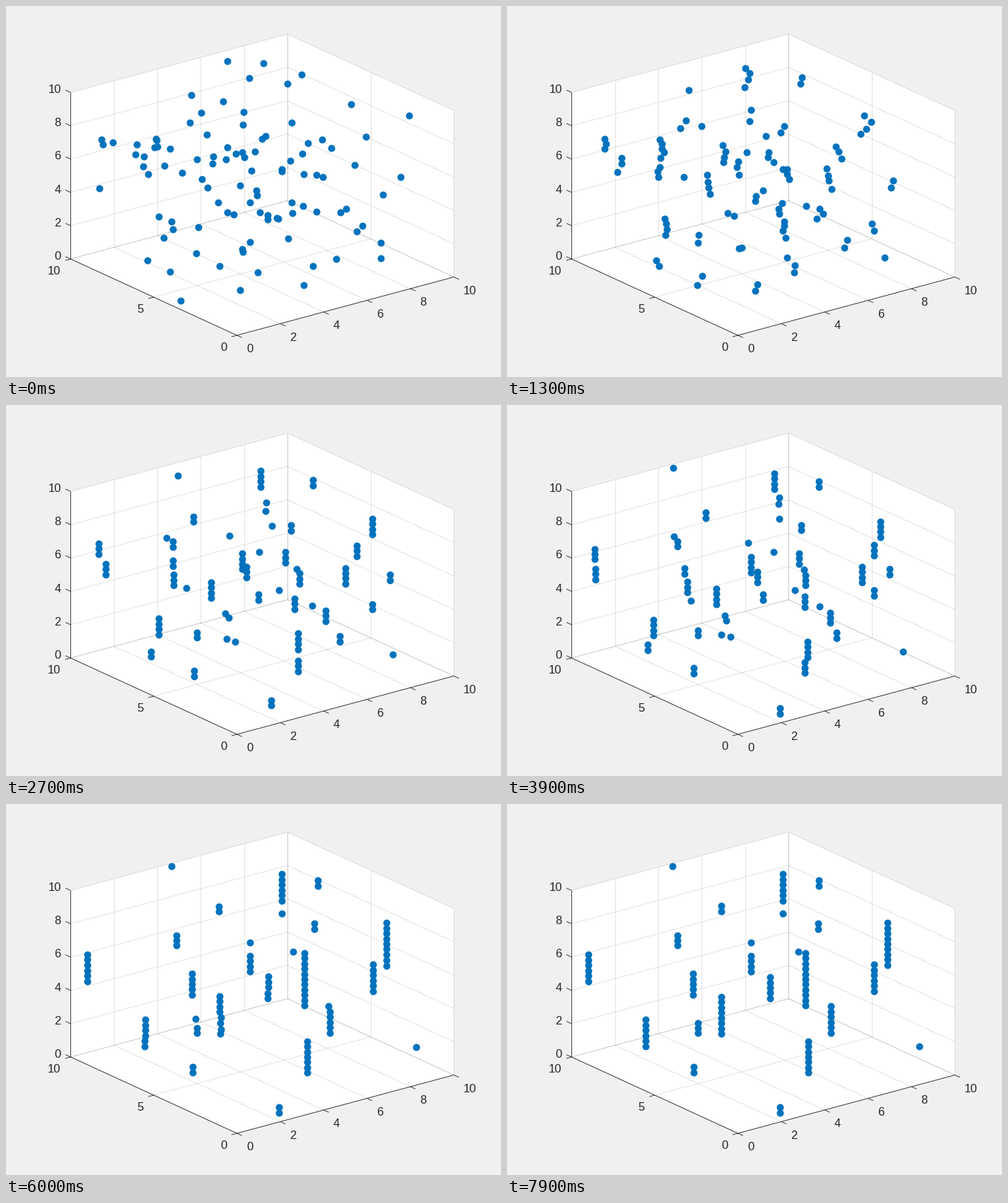
A matplotlib script that plays this animation: 700x525 px, repeating every 8 s.

```python
from itertools import combinations

import numpy as np
import matplotlib.pyplot as plt
from matplotlib.animation import FuncAnimation

W, H, DPI = 700, 525, 100
FRAMES, INTERVAL = 80, 100
GAP = 7.45            # vertical distance of stacked dots
GATHER_MS = 2600      # time in which dots close up into small groups
BLUE, INK = "#0072BD", "#262626"
PT = 72 / DPI         # one pixel in points

rng = np.random.default_rng(7)

fig = plt.figure(figsize=(W / DPI, H / DPI), dpi=DPI, facecolor="#F0F0F0")
ax = fig.add_axes([0, 0, 1, 1])
ax.set_xlim(0, W)
ax.set_ylim(H, 0)
ax.axis("off")

# ---- the box: orthographic projection of a 10 x 10 x 10 cube ----
ORIGIN = np.array([326.5, 466])
UX, UY, UZ = np.array([[30.68, -8.25], [-23.52, -10.8], [0, -23.57]])


def proj(x, y, z):
    return ORIGIN + x * UX + y * UY + z * UZ


def line(a, b, alpha=1.0, z=3):
    ax.plot(*zip(a, b), color=INK, alpha=alpha, lw=0.85 * PT, zorder=z,
            solid_capstyle="butt")


def grid(a, b):
    line(proj(*a), proj(*b), alpha=0.15, z=2)


def tick(p, d, value, shift, ha):
    line(p, p + d)
    ax.text(*(p + shift), str(value), ha=ha, va="center", color=INK,
            family="Liberation Sans", fontsize=16.67 * PT)


for wall in ([(0, 0, 0), (10, 0, 0), (10, 10, 0), (0, 10, 0)],
             [(0, 10, 0), (10, 10, 0), (10, 10, 10), (0, 10, 10)],
             [(10, 0, 0), (10, 10, 0), (10, 10, 10), (10, 0, 10)]):
    ax.fill(*zip(*[proj(*c) for c in wall]), color="white", lw=0, zorder=1)

for v in range(0, 11, 2):
    grid((v, 0, 0), (v, 10, 0))
    grid((v, 10, 0), (v, 10, 10))
    grid((0, 10, v), (10, 10, v))
    grid((10, 0, v), (10, 10, v))
    tick(proj(v, 0, 0), (7.3, 3.3), v, (13.7, 19.6), "left")
    tick(proj(0, 10, v), (-7.3, -3.3), v, (-13.5, -3.7), "right")
for v in (0, 5, 10):
    grid((0, v, 0), (10, v, 0))
    grid((10, v, 0), (10, v, 10))
    tick(proj(0, v, 0), (-7.6, 2.1), v, (-14.3, 17.6), "right")

line(proj(0, 0, 0), proj(10, 0, 0))
line(proj(0, 0, 0), proj(0, 10, 0))
line(proj(0, 10, 0), proj(0, 10, 10))

# ---- the dots: scattered, then small groups, then columns ----
# centre x, centre y and number of dots of each column at the end
COLUMNS = [
    (234, 88, 1), (303, 148, 2), (115, 232, 6), (241, 193, 3),
    (263, 255, 5), (196, 324, 6), (270, 317, 3), (303, 299, 8),
    (264, 376, 2), (386, 433, 2), (426, 358, 7), (372, 260, 5),
    (345, 196, 1), (345, 226, 4), (390, 118, 6), (390, 155, 1),
    (441, 112, 2), (440, 173, 2), (412, 209, 1), (422, 248, 11),
    (458, 305, 6), (519, 246, 6), (538, 198, 9), (583, 343, 1),
]


def offsets(n):
    """Places of n stacked dots around their centre."""
    dy = (np.arange(n) - (n - 1) / 2) * GAP
    return np.column_stack([np.zeros(n), dy])


slots = np.vstack([np.array([x, y]) + offsets(n) for x, y, n in COLUMNS])
scatter = np.array([proj(*p) for p in rng.uniform(0, 10, (len(slots), 3))])

# Swap starting places until every dot heads for a column nearby.
cost = ((scatter[:, None] - slots) ** 2).sum(axis=2)
owner = np.arange(len(slots))
for _ in range(12):
    for i, j in combinations(range(len(slots)), 2):
        a, b = owner[i], owner[j]
        if cost[b, i] + cost[a, j] < cost[a, i] + cost[b, j]:
            owner[i], owner[j] = b, a
starts = scatter[owner]

# Cut each column into groups of one to four; a group first meets halfway.
meets = np.empty_like(slots)
arrival = np.empty((len(slots), 1))
first = 0
for *_, n in COLUMNS:
    end = first + n
    while first < end:
        last = min(first + rng.integers(1, 5), end)
        meets[first:last] = starts[first:last].mean(axis=0) + offsets(last - first)
        arrival[first:last] = rng.uniform(3600, 7600)
        first = last


def positions(t):
    gather = 1 - (1 - min(t / GATHER_MS, 1)) ** 3
    s = np.clip(t / arrival, 0, 1)
    merge = s * s * (3 - 2 * s)
    home = meets + merge * (slots - meets)
    return starts + gather * (home - starts)


dots = ax.scatter(*starts.T, s=(10 * PT) ** 2, color=BLUE, lw=0, zorder=5)


def update(frame):
    dots.set_offsets(positions(frame * INTERVAL))
    return (dots,)


anim = FuncAnimation(fig, update, frames=FRAMES, interval=INTERVAL,
                     repeat=True, repeat_delay=0, blit=False)
plt.show()
```
